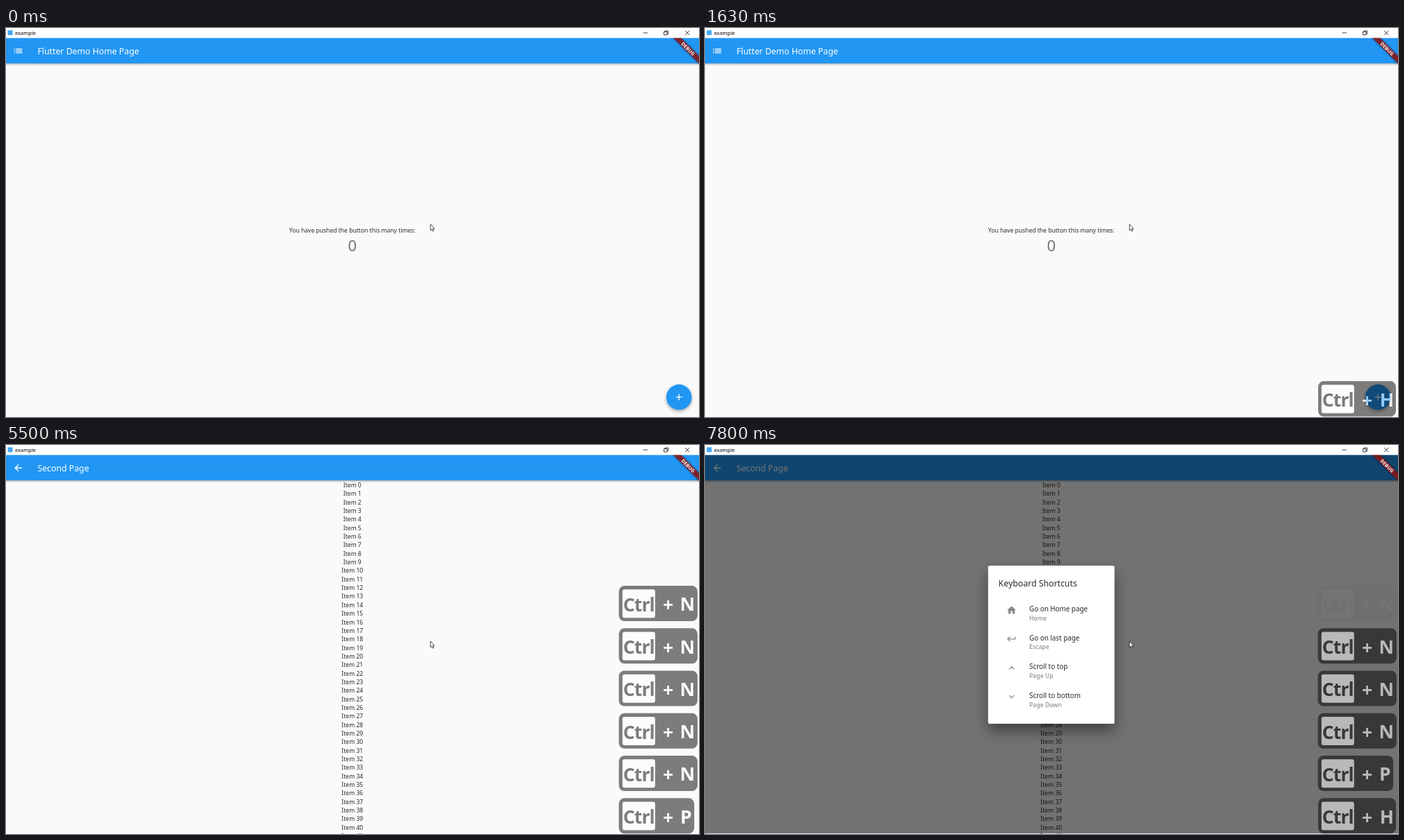
These frames come from a looping animation (998x561 px, 8 s). An HTML page:

```html
<!DOCTYPE html>
<html lang="en">
<head>
<meta charset="utf-8">
<title>Keyboard shortcuts demo</title>
<style>
  html, body { margin: 0; width: 100%; height: 100%; overflow: hidden; background: #fafafa; }
  svg { display: block; width: 998px; height: 561px; font-family: "Noto Sans", "Open Sans", sans-serif; }
  .mid { text-anchor: middle; }
  .h { font-size: 12.3px; }
  .row { font-size: 9.85px; }
  .body { font-size: 8.57px; }
  .sub { font-size: 8.6px; letter-spacing: .13px; }
  .ink { fill: rgba(0, 0, 0, .84); }
  .soft { fill: rgba(0, 0, 0, .54); }
  .bar { fill: #2196f3; filter: drop-shadow(0 1.3px 1.6px rgba(0, 0, 0, .4)); }
  .fab { fill: #2196f3; filter: drop-shadow(0 2.5px 2.5px rgba(0, 0, 0, .35)); }
  .card { fill: #fff; filter: drop-shadow(0 10px 10px rgba(0, 0, 0, .42)); }
  .key { font-weight: 700; font-size: 26.5px; }
  .line { fill: none; stroke: #111; stroke-width: .8; }
</style>
</head>
<body>
<svg id="stage" viewBox="0 0 998 561"></svg>
<script>
const stage = document.getElementById('stage');
const LOOP = 8000;

const ICONS = {
  list: '<path d="M3 13h2v-2H3zm0 4h2v-2H3zm0-8h2V7H3zm4 4h14v-2H7zm0 4h14v-2H7zM7 7v2h14V7z"/>',
  back: '<path d="M20 11H7.83l5.59-5.59L12 4l-8 8 8 8 1.41-1.41L7.83 13H20z"/>',
  add: '<path d="M19 13h-6v6h-2v-6H5v-2h6V5h2v6h6z"/>',
  home: '<path d="M10 20v-6h4v6h5v-8h3L12 3 2 12h3v8z"/>',
  enter: '<path d="M19 7v4H5.83l3.58-3.59L8 6l-6 6 6 6 1.41-1.41L5.83 13H21V7z"/>',
  up: '<path d="M7.41 15.41L12 10.83l4.59 4.58L18 14l-6-6-6 6z"/>',
  down: '<path d="M7.41 8.59L12 13.17l4.59-4.58L18 10l-6 6-6-6z"/>',
  gear: `<g fill="none" stroke="#000"><circle cx="12" cy="12" r="5.3" stroke-width="3.6"/>
    <circle cx="12" cy="12" r="8.1" stroke-width="3.4" pathLength="60" stroke-dasharray="5 5" stroke-dashoffset="-2.5"/></g>`
};

const text = (x, y, cls, s) => `<text x="${x}" y="${y}" class="${cls}">${s}</text>`;
const icon = (name, cx, cy, attrs) =>
  `<g transform="translate(${cx} ${cy}) scale(.655) translate(-12 -12)" ${attrs}>${ICONS[name]}</g>`;

const appBar = (name, title) => `<rect class="bar" x="-8" y="14.3" width="1014" height="36.7"/>
  ${icon(name, 17.5, 33, 'fill="#fff"')}<g fill="#fff">${text(45.4, 38.3, 'h', title)}</g>`;

function dialog(id, top, height, rows) {
  const lines = rows.map(([name, title, keys], i) => {
    const y = top + 66 + i * 41.6;
    return icon(name, 441.5, y - 1.8, 'opacity=".46"') +
      text(467, y, 'row ink', title) + text(467, y + 12.8, 'sub soft', keys);
  });
  return `<g id="${id}"><rect class="card" x="407.7" y="${top}" width="182" height="${height}" rx="2.6"/>
    ${text(422.6, top + 30, 'h ink', 'Keyboard Shortcuts')}${lines.join('')}
    ${id === 'help1' ? '<path d="M423.500 345H574" stroke="#e0e0e0"/>' : ''}</g>`;
}

const PANEL = { N: [882.6, 113.3, 981.3], H: [883, 112, 981.8], P: [882.6, 108.6, 979.3] };
// letter, time pressed, fade as [time, opacity] pairs
const presses = [
  ['H', 70, [[3700, .33], [3750, .15], [3810, 0]]],
  ['N', 2300, [[7310, .33], [7360, .16], [7410, 0]]],
  ['N', 2720, [[7750, .22], [7800, .015]]],
  ['N', 3010, []], ['N', 3360, []], ['N', 3700, []],
  ['P', 5180, []], ['H', 6680, []]
];

function panel([letter]) {
  const [x, w, mid] = PANEL[letter];
  return `<g class="panel"><rect x="${x}" y="509.3" width="${w}" height="51" rx="8"/>
    <rect x="887.8" y="514.4" width="47" height="41" rx="3" fill="#fff"/>
    <text x="888.800" y="546" class="key" letter-spacing="-.9">Ctrl</text>
    <g fill="#fff">${text(953.7, 546.5, 'key mid', '+')}${text(mid, 545.6, 'key mid', letter)}</g></g>`;
}

const items = Array.from({ length: 42 }, (_, i) =>
  text(498.8, 61 + i * 12.345, 'body mid ink', 'Item ' + i)).join('');

stage.innerHTML = `
  <rect width="998" height="561" fill="#fafafa"/>
  ${text(498.8, 294.9, 'body mid ink', 'You have pushed the button this many times:')}
  <text id="count" x="498.700" y="321.600" class="mid soft" font-size="22">0</text>
  ${appBar('list', 'Flutter Demo Home Page')}
  <circle class="fab" cx="969.2" cy="532.4" r="18.3"/>
  ${icon('add', 969.2, 532.4, 'fill="#fff"')}
  <g id="page"><rect y="14.3" width="998" height="547" fill="#fafafa"/>${items}${appBar('back', 'Second Page')}</g>
  <rect id="shade" y="14.3" width="998" height="545.9"/>
  ${dialog('help1', 210, 155.3, [
    ['gear', 'Go to Second Page', 'Control Left + Key P'],
    ['gear', 'Increment', 'Control Left + Key N']])}
  ${dialog('help2', 174, 228, [
    ['home', 'Go on Home page', 'Home'],
    ['enter', 'Go on last page', 'Escape'],
    ['up', 'Scroll to top', 'Page Up'],
    ['down', 'Scroll to bottom', 'Page Down']])}
  <g transform="translate(998 14.3) rotate(45)">
    <rect x="-27" y="18.300" width="54" height="7.900" fill-opacity=".5" style="filter:blur(1.8px)"/>
    <rect x="-27" y="18.300" width="54" height="7.900" fill-opacity=".4"/>
    <rect x="-27" y="18.300" width="54" height="7.900" fill="#b71c1c" fill-opacity=".65"/>
    <text y="24.800" class="mid" fill="#fff" font-size="7" font-weight="900">DEBUG</text>
  </g>
  <rect width="998" height="14.3" fill="#fff"/>
  <rect x="2.500" y="3.300" width="7" height="7" fill="#42a5f5"/>
  <text x="13" y="9.800" font-size="7.5">example</text>
  <path class="line" d="M917.500 7h6.500M947.500 5.500h4.500v4.500h-4.500zM949 5.500v-1.500h4.500v4.500h-1.500M978 3.800l6.400 6.400M984.400 3.800l-6.400 6.400"/>
  <path d="M611.300 282.900v9l2-1.800 1.400 2.900 1.300-.6-1.300-2.800h2.500z" fill="#fff" stroke="#222" stroke-width=".8"/>
  ${presses.map(panel).join('')}`;

const el = id => document.getElementById(id);
const [count, page, shade, help1, help2] = ['count', 'page', 'shade', 'help1', 'help2'].map(el);
const panels = [...stage.querySelectorAll('.panel')];

// Value of the last [time, value] pair reached
const at = (t, start, keys) => keys.reduce((v, [k, x]) => t >= k ? x : v, start);
const fade = (node, v) => node.setAttribute('opacity', v);

const COUNT = [[2350, 1], [2770, 2], [3060, 3], [3360, 4], [3750, 5]];
const HELP1 = [[70, .3], [110, .6], [140, .8], [180, .95], [220, 1],
  [1500, .75], [1540, .45], [1590, .15], [1630, 0]];
const HELP2 = [[6680, .3], [6730, .7], [6800, .93], [6860, 1]];
const PAGE = [[5180, .05], [5240, .22], [5310, .43], [5370, .64], [5440, .85], [5500, 1]];

function draw(t) {
  count.textContent = at(t, 0, COUNT);

  const a = at(t, 0, HELP1), b = at(t, 0, HELP2);
  fade(help1, a);
  fade(help2, b);
  fade(shade, .54 * Math.max(a, b) ** .87);

  const p = at(t, 0, PAGE);
  fade(page, p ** 1.8);
  page.setAttribute('transform', `translate(0 ${137 * (1 - p ** 1.6) ** 3})`);

  presses.forEach(([, time, out], i) => {
    const slot = presses.filter(q => q[1] > time && q[1] <= t).length;
    fade(panels[i], t < time ? 0 : at(t, .5, out));
    panels[i].setAttribute('transform', `translate(0 ${-61.25 * slot})`);
  });
}

function tick() {
  draw(performance.now() % LOOP);
  requestAnimationFrame(tick);
}
tick();
</script>
</body>
</html>
```
